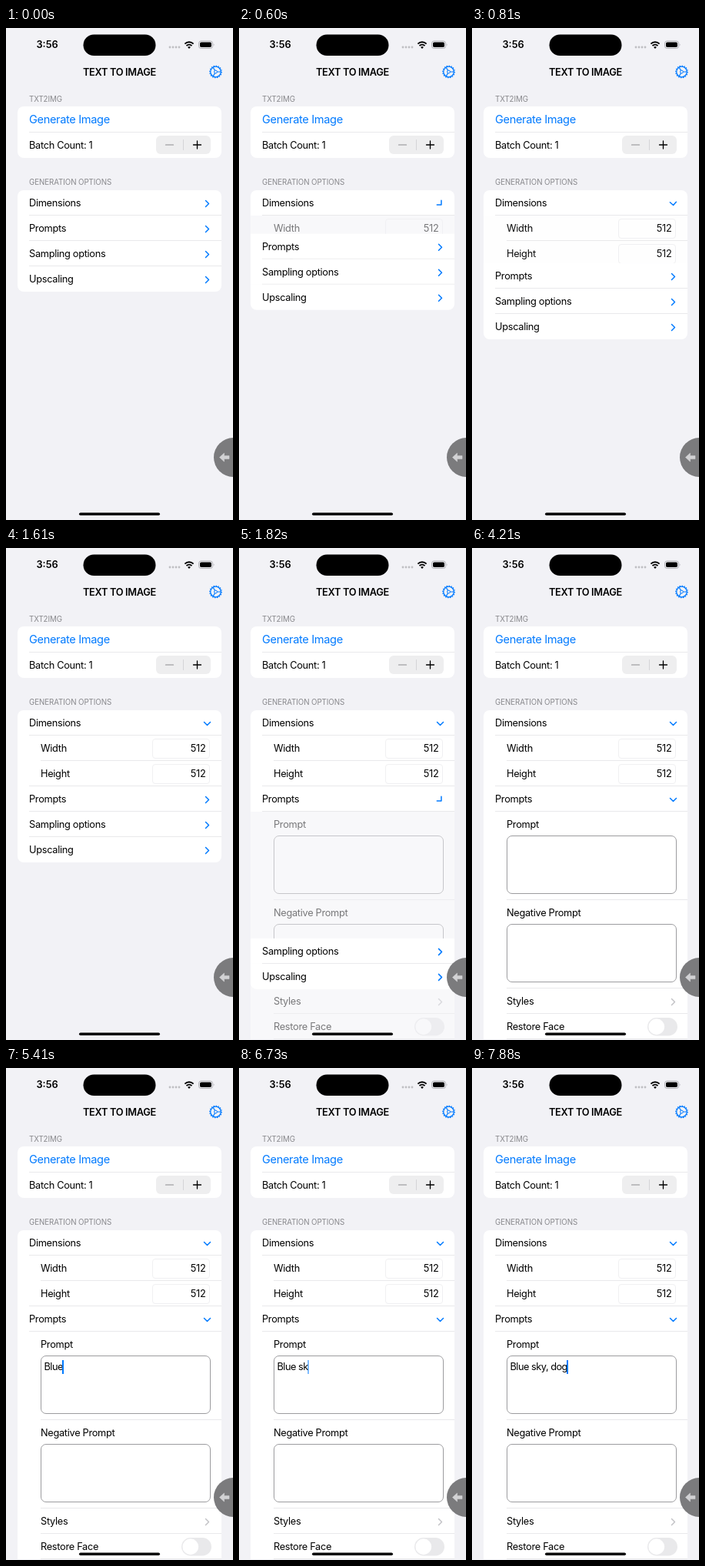
These frames come from a looping animation (295 px wide and 640 px high, 8 s). An HTML page:

```html
<!DOCTYPE html>
<html lang="en">
<head>
<meta charset="utf-8">
<title>Text to image</title>
<style>
  html, body { margin: 0; width: 100%; height: 100%; overflow: hidden; background: #f2f2f6; }
  #stage {
    position: relative; width: 295px; height: 640px; overflow: hidden; background: #f2f2f6;
    font: 12.77px/33px Inter, Roboto, sans-serif; letter-spacing: -.3px; color: #000; white-space: pre;
  }
  #stage div, #stage svg { position: absolute; box-sizing: border-box; }
  .row { left: 15px; width: 265px; height: 33px; padding-left: 15px; background: #fff; }
  .row.first { border-radius: 8px 8px 0 0; }
  .row.last { border-radius: 0 0 8px 8px; }
  .row.sub { padding-left: 30px; }
  .row.tall { height: 115px; }
  .row:not(.last)::after {
    content: ""; position: absolute; left: 15px; right: 0; bottom: 0; height: 1px; background: #e9e9eb;
  }
  .row.sub:not(.end)::after { left: 30px; }
  .head { left: 30px; font-size: 9.75px; letter-spacing: -.08px; line-height: 20px; color: #88888c; }
  .field {
    left: 175px; top: 4px; width: 75px; height: 26px; border: 1px solid #f0f0f2; border-radius: 4px;
    line-height: 24px; text-align: right; padding-right: 4.5px;
  }
  .area { left: 30px; top: 31px; width: 221px; height: 76px; border: 1px solid #9c9c9f; border-radius: 7px; }
  .chevron { left: 239px; top: 9.5px; width: 15px; height: 15px; fill: none; stroke: #007aff; stroke-width: 1.5; stroke-linecap: round; stroke-linejoin: round; }
  .grey { stroke: #c2c2c6; }
  #entry { left: 3.5px; top: 4px; line-height: 19px; letter-spacing: -.5px; }
  #caret { display: inline-block; position: relative; left: -1px; top: -1px; width: 2px; height: 18px; margin-right: -2px; vertical-align: middle; background: #007aff; }
</style>
</head>
<body>
<div id="stage">
  <div class="head" style="top:82.5px">TXT2IMG</div>
  <div class="row first" style="top:102px;height:33.5px;font-size:14.6px;letter-spacing:-.36px;line-height:34px;color:#007aff">Generate Image</div>
  <div class="row last" style="top:135.5px">Batch Count: 1</div>
  <svg style="left:194.5px;top:140px" width="71" height="24" fill="none" stroke-linecap="round">
    <rect width="71" height="24" rx="6" fill="#eeeeef"/>
    <path d="M35.5 5.5v13" stroke="#d4d4d7"/>
    <path d="M12.5 12h10" stroke="#8c8c8f" stroke-width="1.2"/>
    <path d="M48.5 12h10m-5-5v10" stroke="#000" stroke-width="1.3"/>
  </svg>

  <div class="head" style="top:191px">GENERATION OPTIONS</div>
  <div id="list" style="left:0;top:211px"></div>

  <svg width="295" height="640" style="left:0;top:0">
    <rect x="100.5" y="8.5" width="94" height="27.5" rx="13.75"/>
    <g fill="#bfbfc3">
      <circle cx="213" cy="25" r="1.4"/><circle cx="217" cy="25" r="1.4"/>
      <circle cx="221" cy="25" r="1.4"/><circle cx="225" cy="25" r="1.4"/>
    </g>
    <g fill="none" stroke="#000" stroke-width="1.9">
      <path d="M232.4 20.6a8 8 0 0 1 11.2 0M234.5 23.1a5 5 0 0 1 7 0"/>
    </g>
    <path d="M238 27l-1.9-2a2.7 2.7 0 0 1 3.8 0z"/>
    <rect x="250.5" y="17" width="18" height="9.5" rx="3" fill="none" stroke="#a9a9ad" stroke-width=".9"/>
    <rect x="252" y="18.5" width="15" height="6.5" rx="1.8"/>
    <path d="M269.8 20.2q1.6 1.5 0 3.2z" fill="#a9a9ad"/>
    <g transform="translate(272.5 57)" fill="none" stroke="#007aff">
      <circle r="6.8" stroke-width="1.3"/>
      <circle r="7.8" stroke-width="1.1" pathLength="32" stroke-dasharray="1 1"/>
      <circle r="1.9" stroke-width="1"/>
      <path d="M1.9 0H6.5M-.95 1.65L-3.25 5.6M-.95-1.65L-3.25-5.6" stroke-width="1.1"/>
    </g>
    <circle cx="295.5" cy="558.5" r="25.5" fill="#7b7b7d"/>
    <path d="M277.5 558.5l6-5.5v3.4h6.5v4.2h-6.5v3.4z" fill="#d2d2d4" stroke="#d2d2d4" stroke-width=".6" stroke-linejoin="round"/>
    <rect x="95" y="630.5" width="105" height="3.5" rx="1.75"/>
  </svg>
  <div style="left:39.5px;top:12px;line-height:20px;font-weight:600;letter-spacing:0">3:56</div>
  <div style="left:0;top:48px;width:295px;line-height:20px;font-weight:600;text-align:center">TEXT TO IMAGE</div>
</div>

<script>
const LOOP = 8000, ROW = 33, DIMENSIONS = 66, PROMPTS = 458;

const chevron = (cls = '') =>
  `<svg class="chevron ${cls}" viewBox="-7.5 -7.5 15 15"><path d="M-2-4L2 0L-2 4"/></svg>`;
const field = '<div class="field">512</div>';
const toggle = `<svg style="left:213px;top:5px" width="39" height="24">
  <rect width="39" height="23.5" rx="11.75" fill="#e9e9eb"/><circle cx="11.8" cy="11.75" r="10.4" fill="#fff"/></svg>`;
const list = document.getElementById('list');

function addRow(top, html, cls = '') {
  const row = document.createElement('div');
  row.className = 'row ' + cls;
  row.style.top = top + 'px';
  row.innerHTML = html;
  list.append(row);
  return row;
}

// Inserted rows come first so that the sliding rows cover them.
const promptRows = [
  addRow(132, 'Prompt<div class="area"><div id="entry"><span id="typed"></span><span id="caret"></span></div></div>', 'sub tall'),
  addRow(247, 'Negative Prompt<div class="area"></div>', 'sub tall'),
  addRow(362, 'Styles' + chevron('grey'), 'sub'),
  addRow(395, 'Restore Face' + toggle, 'sub')
];
const sizeRows = [
  addRow(ROW, 'Width' + field, 'sub'),
  addRow(2 * ROW, 'Height' + field, 'sub end')
];
const [dimensions, prompts, sampling, upscaling] =
  ['Dimensions', 'Prompts', 'Sampling options', 'Upscaling'].map((name, i) =>
    addRow(i * ROW, name + chevron(), ['first', '', '', 'last'][i]));

const typed = document.getElementById('typed');
const caret = document.getElementById('caret');

// [delay, slide, opacity, chevron angle]
const unfold = [[0, .07, .1, 15], [100, .36, .5, 45], [200, .73, .78, 75], [300, .94, .95, 87], [410, 1, 1, 90]];

// [time, text length]
const typing = [[5010, 1], [5110, 2], [5310, 3], [5410, 4], [5720, 5], [5840, 6], [6370, 7],
  [7160, 8], [7300, 9], [7550, 10], [7690, 11], [7880, 13]];

// [time, caret opacity]
const blinking = [[3450, 1], [4110, .5], [4210, 0], [4410, 1], [6730, .5], [6840, 0], [7160, 1]];

const stepAt = (table, time, initial) => table.reduce((now, step) => time >= step[0] ? step : now, initial);

function open(header, rows, time) {
  const [, slide, opacity, angle] = stepAt(unfold, time, [0, 0, 0, 0]);
  header.querySelector('path').setAttribute('transform', `rotate(${angle})`);
  for (const row of rows) row.style.opacity = opacity;
  return slide;
}

function draw(time) {
  const a = DIMENSIONS * open(dimensions, sizeRows, time - 500);
  const b = PROMPTS * open(prompts, promptRows, time - 1720);
  prompts.style.transform = `translateY(${a}px)`;
  for (const row of [sampling, upscaling]) row.style.transform = `translateY(${a + b}px)`;
  typed.textContent = 'Blue sky, dog'.slice(0, stepAt(typing, time, [0, 0])[1]);
  caret.style.opacity = stepAt(blinking, time, [0, 0])[1];
}

const start = performance.now();
function tick() {
  draw((performance.now() - start) % LOOP);
  requestAnimationFrame(tick);
}
tick();
</script>
</body>
</html>
```
